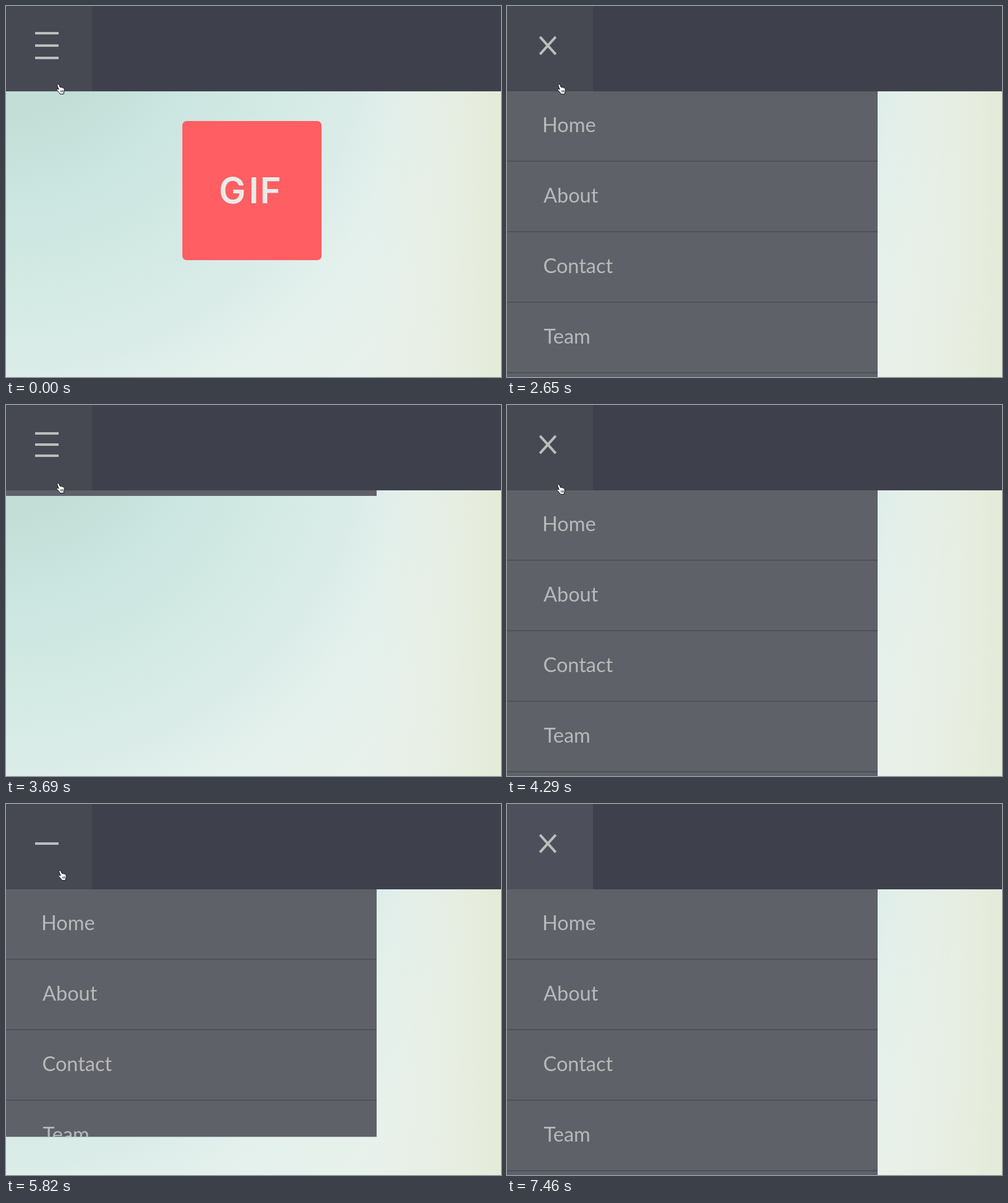
An HTML page for the animation above (7920 ms loop, 800 by 600 pixels).

```html
<!DOCTYPE html>
<html lang="en">
<head>
<meta charset="utf-8">
<title>Menu toggle</title>
<style>
  html, body { margin: 0; width: 100%; height: 100%; overflow: hidden; }
  body {
    position: relative;
    background:
      linear-gradient(90deg, #e6ebda00 590px, #e7ece080 690px, #e6ecdccc 755px, #e5ebd9 790px),
      radial-gradient(circle at 0 0, #c3ded7 180px, #cbe5e0 310px, #d2e9e3 430px,
        #daece8 570px, #e3f0ec 670px, #e8f1ec 800px, #e9f0e8 950px);
  }
  svg { position: absolute; left: 0; top: 0; display: block; }
  #logo text { font: 600 58px Inter, "Open Sans", sans-serif; fill: #e8ecea; }
  #menu text { font: 32.5px Lato, "Open Sans", sans-serif; fill: #b9b9b9; }
  #menu text.hover { fill: #d8d8d8; }
  #button { fill: #4d505a; }
  #button.hover { fill: #464952; }
  #icon rect { fill: #bdbdbb; }
</style>
</head>
<body>
<svg width="800" height="600" viewBox="0 0 800 600">
  <defs>
    <clipPath id="reveal"><rect id="shade" y="138" width="599" height="0"/></clipPath>
  </defs>

  <g id="logo">
    <rect x="285" y="186" width="225" height="225" rx="7" fill="#ff5e62"/>
    <text x="344 392.5 410.5" y="319">GIF</text>
  </g>

  <g id="menu" clip-path="url(#reveal)">
    <rect y="138" width="599" height="570" fill="#5f6169"/>
    <path d="M0 251H599M0 365H599M0 479H599M0 593H599" stroke="#4f505c" stroke-width="2"/>
    <text x="57" y="204">Home</text>
    <text x="59" y="318">About</text>
    <text x="58.5" y="432">Contact</text>
    <text x="59.5" y="546">Team</text>
  </g>

  <rect width="800" height="138" fill="#3e414c"/>
  <rect id="button" width="139" height="138"/>
  <g id="icon">
    <rect x="-19" y="-2" width="38" height="4"/>
    <rect x="-19" y="-2" width="38" height="4"/>
    <rect x="-19" y="-2" width="38" height="4"/>
  </g>

  <g id="cursor" stroke="#111" stroke-linejoin="round">
    <path fill="#fff" d="M2.6 .9C3.8 .3 4.6 1 5 2L6.4 5.4C7.4 4.9 8.3 5.2 8.7 6C9.6 5.6 10.5 5.9 10.9 6.7
      C12 6.4 12.8 7 13 8C13.4 10 13.5 12 12.5 14L12.2 16.4H6.3C5.6 14.4 3.6 12.5 1.6 10.5
      C.6 9.4 .9 8.4 1.8 8.2C2.6 8 3.5 8.6 4.2 9.3L1.9 2.8C1.6 2 1.8 1.3 2.6 .9Z"/>
    <path fill="none" stroke-width=".8" d="M7.3 10.5L7.8 13.5M9.2 10.2L9.6 13.5M11 10L11.2 13.5"/>
  </g>
</svg>

<script>
const LOOP = 7920, FULL = 570, TILT = 48;

// [visible from, time already elapsed, opening?, elapsed limit]
const toggles = [
  [1440, 40, true, 40],
  [1590, 40, true],
  [2650, 0, false],
  [3690, 32, true],
  [5650, 0, false],
  [6560, 44, true]
];

// [start, end, x0, y0, x1, y1]
const moves = [
  [0, 1, 81, 126, 81, 126],
  [4290, 4820, 80, 128, 95, 314],
  [4960, 5470, 95, 314, 84, 107],
  [6880, 7310, 84, 107, 728, 575],
  [7400, 7401, 742, 584, 742, 584]
];

const $ = id => document.getElementById(id);
const logo = $("logo"), shade = $("shade"), button = $("button"), cursor = $("cursor");
const bars = [...$("icon").children];
const labels = [...$("menu").querySelectorAll("text")];

const part = (t, from, to) => Math.min(1, Math.max(0, (t - from) / (to - from)));
const swing = p => 0.5 - Math.cos(p * Math.PI) / 2;
const latest = (list, t) => list.filter(item => item[0] <= t).pop();

// spread: bar distance from the middle, turn: degrees, wide: bar scale
function opening(t) {
  return {
    height: FULL * swing(part(t, 0, 400)),
    spread: 20 * (1 - part(t, 0, 150) ** 1.5),
    turn: TILT * (1 - (1 - part(t, 158, 470)) ** 2),
    wide: 1 + 0.21 * (part(t, 90, 152) - part(t, 158, 400))
  };
}

function closing(t) {
  return {
    height: FULL * (1 - swing(part(t, 23, 423))),
    spread: 20 * swing(part(t, 175, 430)),
    turn: TILT * (1 - swing(part(t, 0, 155))),
    wide: 1
  };
}

function menuState(t) {
  const toggle = latest(toggles, t);
  if (!toggle) return closing(LOOP);
  const [at, lead, opens, limit = LOOP] = toggle;
  return (opens ? opening : closing)(Math.min(t - at + lead, limit));
}

function drawMenu({ height, spread, turn, wide }) {
  shade.setAttribute("height", height);
  bars.forEach((bar, i) => {
    const side = i - 1;
    bar.setAttribute("transform",
      `translate(66 ${64 + side * spread}) rotate(${side * turn}) scale(${wide} 1)`);
  });
  bars[1].style.display = turn ? "none" : "";
}

function drawCursor(t, height) {
  const [t0, t1, x0, y0, x1, y1] = latest(moves, t);
  const p = swing(part(t, t0, t1));
  const x = x0 + (x1 - x0) * p, y = y0 + (y1 - y0) * p;
  const shown = t < 7460;
  cursor.style.display = shown ? "" : "none";
  cursor.setAttribute("transform", `translate(${Math.round(x)} ${Math.round(y)})`);

  const tipX = x + 3, tipY = y + 1;
  button.classList.toggle("hover", shown && tipX < 139 && tipY < 138);
  labels.forEach((label, i) => {
    const top = tipY - 138 - i * 114;
    label.classList.toggle("hover",
      shown && tipX < 599 && tipY - 138 < height && top >= 0 && top < 114);
  });
}

function draw(t) {
  const state = menuState(t);
  logo.style.display = t < 1440 ? "" : "none";
  drawMenu(state);
  drawCursor(t, state.height);
}

let start;
function tick(now) {
  start ??= now;
  draw((now - start) % LOOP);
  requestAnimationFrame(tick);
}
draw(0);
requestAnimationFrame(tick);
</script>
</body>
</html>
```
